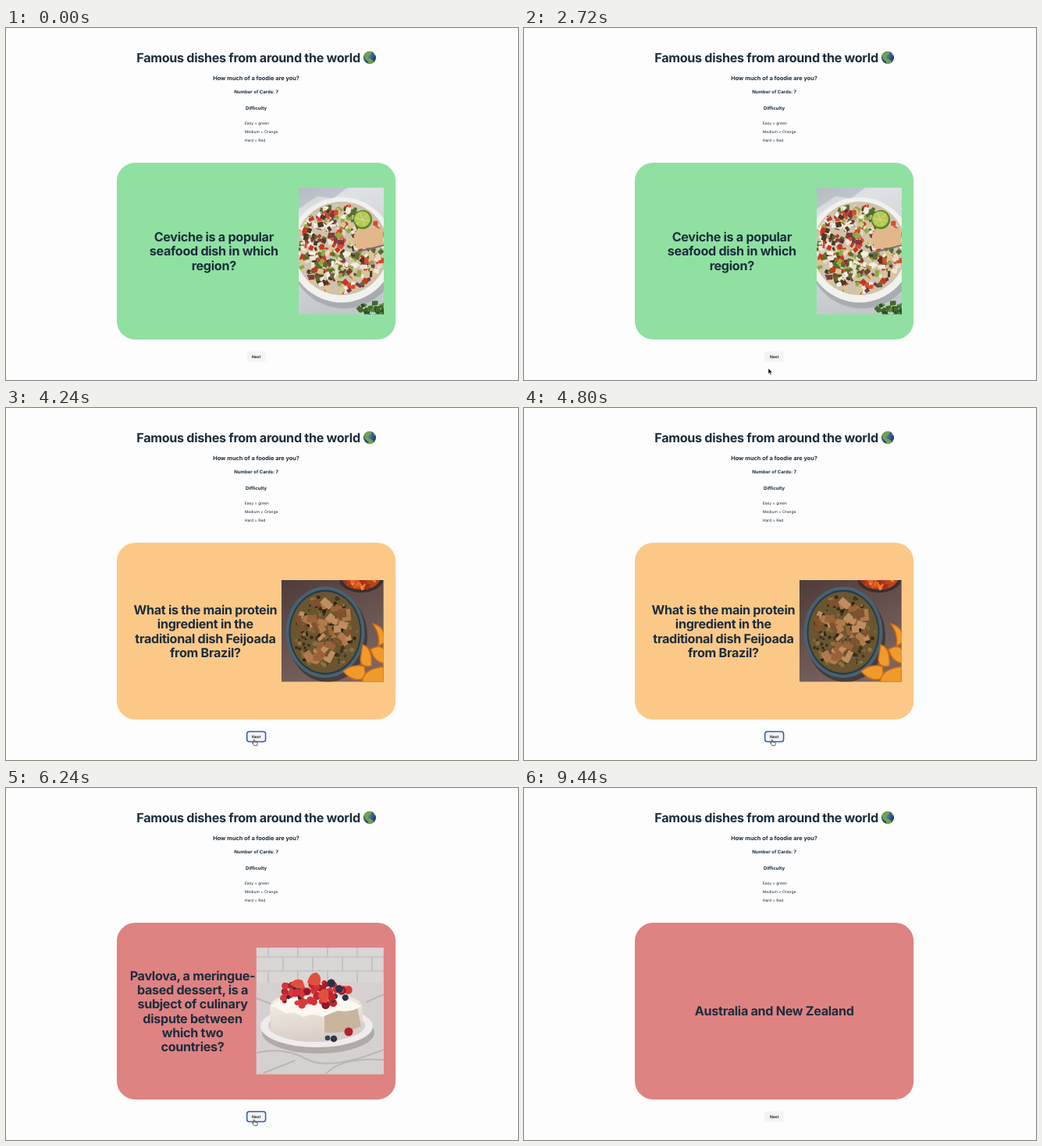
Write an HTML page that moves like this. It is 656x452 px and loops after 9760 ms.

```html
<!DOCTYPE html>
<html lang="en">
<head>
<meta charset="utf-8">
<title>Flashcards</title>
<style>
  html, body { margin: 0; width: 100%; height: 100%; overflow: hidden; background: #fdfdfd; }
  svg { display: block; width: 656px; height: 452px; }
  text { font-family: Inter, "Open Sans", sans-serif; fill: #1b2d3d; text-rendering: geometricPrecision; }
  .mid { text-anchor: middle; font-weight: 700; }
  .big { font-size: 16.2px; letter-spacing: -.02em; }
  .small { font-size: 6px; }
  .item { font-size: 5px; }

  .scene, .ring, .cursor > g { opacity: 0; animation: 9760ms step-end infinite; }
  #ceviche { animation-name: ceviche; }
  #feijoada { animation-name: feijoada; }
  #risotto { animation-name: risotto; }
  #pavlova { animation-name: pavlova; }
  #answer { animation-name: answer; }
  .ring { animation-name: ring; }
  @keyframes ceviche { 0% { opacity: 1 } 35.25%, 100% { opacity: 0 } }
  @keyframes feijoada { 0% { opacity: 0 } 35.25% { opacity: 1 } 54.92%, 100% { opacity: 0 } }
  @keyframes risotto { 0% { opacity: 0 } 54.92% { opacity: 1 } 60.66%, 100% { opacity: 0 } }
  @keyframes pavlova { 0% { opacity: 0 } 60.66% { opacity: 1 } 72.95%, 100% { opacity: 0 } }
  @keyframes answer { 0% { opacity: 0 } 72.95%, 100% { opacity: 1 } }
  @keyframes ring { 0% { opacity: 0 } 35.25% { opacity: 1 } 72.95%, 100% { opacity: 0 } }

  .cursor { animation: travel 9760ms ease-in-out infinite; }
  #beam { animation-name: beam; }
  #arrow { animation-name: arrow; }
  #hand { animation-name: hand; }
  @keyframes travel {
    0%, 5.74% { transform: translate(338px, 296px) }
    10.66%, 13.11% { transform: translate(325px, 276px) }
    22.95%, 29.51% { transform: translate(313px, 437px) }
    32.79%, 65.57% { transform: translate(318px, 425.8px) }
    71.31%, 81.97% { transform: translate(328px, 286px) }
    87.7%, 100% { transform: translate(624px, 424px) }
  }
  @keyframes beam {
    0% { opacity: 0 } 7.38% { opacity: 1 } 16.39% { opacity: 0 }
    69.67% { opacity: 1 } 83.61%, 100% { opacity: 0 }
  }
  @keyframes arrow {
    0% { opacity: 0 } 16.39% { opacity: 1 } 31.97% { opacity: 0 }
    67.21% { opacity: 1 } 69.67% { opacity: 0 }
    83.61% { opacity: 1 } 87.7%, 100% { opacity: 0 }
  }
  @keyframes hand { 0% { opacity: 0 } 31.97% { opacity: 1 } 67.21%, 100% { opacity: 0 } }
</style>
</head>
<body>
<svg viewBox="0 0 656 452">
  <defs>
    <clipPath id="tall"><rect x="375" y="205" width="109" height="162.5"/></clipPath>
    <clipPath id="mid"><rect x="353" y="221" width="130.7" height="130.5"/></clipPath>
    <clipPath id="wide"><rect x="320.8" y="205" width="163" height="162.5"/></clipPath>
    <clipPath id="disc"><circle cx="466" cy="38" r="8.2"/></clipPath>
    <radialGradient id="sea" cx=".4" cy=".35" r=".7">
      <stop offset="0" stop-color="#4a86c8"/><stop offset="1" stop-color="#16305f"/>
    </radialGradient>
    <linearGradient id="marble" x2=".3" y2="1">
      <stop offset="0" stop-color="#bcc3c8"/><stop offset=".2" stop-color="#dfe2e5"/>
      <stop offset="1" stop-color="#c3c7cc"/>
    </linearGradient>
    <linearGradient id="table" x2=".5" y2="1">
      <stop offset="0" stop-color="#4e3c3a"/><stop offset="1" stop-color="#7b6460"/>
    </linearGradient>
    <linearGradient id="cream" y2="1" x2=".2">
      <stop offset="0" stop-color="#f6efe7"/><stop offset="1" stop-color="#d9cfc6"/>
    </linearGradient>
    <rect id="card" x="142" y="173" width="357.2" height="227" rx="23.5"/>
  </defs>

  <rect width="656" height="452" fill="#fdfdfd"/>
  <text class="mid big" x="310.5" y="44">Famous dishes from around the world</text>
  <g clip-path="url(#disc)">
    <circle cx="466" cy="38" r="8.2" fill="url(#sea)"/>
    <path d="M458 34q3-4 8-4.500l3 1-1 3-3 2-1 3 3 1 4 3-1 3-3 4-2-1-1-5-4-4z" fill="#76a04c"/>
    <path d="M471 31l4 3-1 2-3-2z" fill="#a9a968"/>
  </g>
  <text class="mid" x="320.600" y="67.200" font-size="7.4">How much of a foodie are you?</text>
  <text class="mid small" x="320.600" y="84">Number of Cards: 7</text>
  <text class="mid small" x="320.600" y="105.200">Difficulty</text>
  <text class="item" x="305.800" y="124.200">Easy = green</text>
  <text class="item" x="305.800" y="135.400">Medium = Orange</text>
  <text class="item" x="305.800" y="146.400">Hard = Red</text>

  <g class="scene" id="ceviche">
    <use href="#card" fill="#90e0a2"/>
    <g clip-path="url(#tall)">
      <rect x="375" y="205" width="109" height="163" fill="url(#marble)"/>
      <path d="M375 205h62l-18 14-20-3-24 16z" fill="#aeb8bf" opacity=".6"/>
      <ellipse cx="433" cy="292" rx="69" ry="68" fill="#8d9296" opacity=".5"/>
      <circle cx="430" cy="285" r="67.500" fill="#f2f1ee"/>
      <circle cx="430" cy="283" r="60" fill="#cfc2ae"/>
      <g id="salad"></g>
      <path d="M447 262q10-9 36-4v22l-32 4q-8-10-4-22z" fill="#e2b78c"/>
      <circle cx="457" cy="246" r="12.200" fill="#5f8526"/>
      <circle cx="456.500" cy="245.500" r="10.300" fill="#b5c956"/>
      <path d="M447 244l19 4M453 237l7 17M464 239l-15 13" stroke="#dde59a" stroke-width=".7"/>
      <path d="M484 279l-28 7-12 4" stroke="#77716d" stroke-width="2" fill="none"/>
      <g id="herbs"></g>
    </g>
    <g class="mid big" data-x="266.3" data-y="274">Ceviche is a popular|seafood dish in which|region?</g>
  </g>

  <g class="scene" id="feijoada">
    <use href="#card" fill="#fcc888"/>
    <g clip-path="url(#mid)">
      <rect x="353" y="221" width="131" height="131" fill="url(#table)"/>
      <ellipse cx="455" cy="220" rx="28" ry="17" fill="#37302c"/>
      <ellipse cx="455" cy="219" rx="24" ry="14" fill="#b8451d"/>
      <g id="relish"></g>
      <ellipse cx="412" cy="293" rx="51" ry="59" fill="#2b2324" opacity=".6"/>
      <ellipse cx="409" cy="288" rx="50.500" ry="58.500" fill="#486272"/>
      <ellipse cx="409" cy="288" rx="46.500" ry="54.500" fill="#283b49"/>
      <ellipse cx="409" cy="288" rx="44.500" ry="52" fill="#6a5530"/>
      <g id="stew"></g>
      <g fill="#f09a2c" stroke="#cf6b13" stroke-width="1.500">
        <path d="M470 277q16 4 17 23l-10 6q3-15-7-29z"/>
        <path d="M457 304q13 4 11 27-13 3-14-8z"/>
        <path d="M467 310q13-8 19 2v16q-14-1-19-18z"/>
        <path d="M432 338q12-10 27-6l2 14q-16 8-29-8z"/>
        <path d="M456 352q2-17 28-20v20z"/>
      </g>
    </g>
    <g class="mid big" data-x="255.4" data-y="265">What is the main protein|ingredient in the|traditional dish Feijoada|from Brazil?</g>
  </g>

  <g class="scene" id="risotto">
    <use href="#card" fill="#90e0a2"/>
    <g class="mid big" data-x="262.5" data-y="283.3">What is the main ingredient|in Risotto?</g>
  </g>

  <g class="scene" id="pavlova">
    <use href="#card" fill="#df8282"/>
    <g clip-path="url(#wide)">
      <rect x="320" y="205" width="165" height="163" fill="#d9d7d6"/>
      <path d="M320 217h165M320 235h165M336 205v12M374 205v12M412 205v12M450 205v12M355 217v18M393 217v18M431 217v18M469 217v18M336 235v15M374 235v15M412 235v15M450 235v15" stroke="#b9b6b4" stroke-width="1.200"/>
      <rect x="320" y="249.500" width="165" height="118" fill="#d4d1d0"/>
      <path d="M321 340q35-8 64 8t99-12M410 367q20-22 74-18M321 270l20 8M462 275l22-10M330 366l40-16" stroke="#aaa6a7" stroke-width="2" fill="none" opacity=".6"/>
      <ellipse cx="400" cy="314" rx="72" ry="27" fill="#99918f" opacity=".6"/>
      <ellipse cx="398" cy="306" rx="72" ry="27" fill="#efeceb"/>
      <ellipse cx="398" cy="305" rx="62" ry="21" fill="#d5cfcc"/>
      <path d="M338 283q0-12 20-16h78q22 4 21 18l-1 20q-10 12-48 8l-5 12q-42 4-64-15z" fill="url(#cream)"/>
      <path d="M408 287l42-5 5 24q-20 10-47 8z" fill="#c9b59e"/>
      <path d="M340 280q12-14 56-13t59 13q-12 9-30 6l-20 8q-10-6-24 0-12-8-22-4-12-8-19-10z" fill="#fbf7f1"/>
      <g id="berries"></g>
      <path d="M386 250q3-13 12-13 8 5 4 15-8 4-16-2zM400 267q2-10 11-9 5 7 0 18-8 1-11-9zM364 252q6-9 16-5l3 9q-10 4-19-4z" fill="#e0503c"/>
      <circle cx="439" cy="313" r="5.500" fill="#b3202b"/>
      <circle cx="420" cy="322" r="4.300" fill="#2f3448"/>
      <circle cx="412" cy="321" r="3.300" fill="#39405a"/>
    </g>
    <g class="mid big" data-x="239" data-y="246.5">Pavlova, a meringue-|based dessert, is a|subject of culinary|dispute between|which two|countries?</g>
  </g>

  <g class="scene" id="answer">
    <use href="#card" fill="#df8282"/>
    <g class="mid big" data-x="320.7" data-y="292.3">Australia and New Zealand</g>
  </g>

  <rect x="308.300" y="415.300" width="24.600" height="13.600" rx="3.200" fill="#f4f4f4"/>
  <rect class="ring" x="308.700" y="415.600" width="23.900" height="13" rx="3" fill="none" stroke="#2859b8" stroke-width="1.500"/>
  <text class="mid" x="320.600" y="423.900" font-size="5" style="font-weight:600;fill:#111">Next</text>

  <g class="cursor">
    <g id="beam">
      <path d="M-1.500-4.300q1.500 0 1.500 1v6.600q0 1-1.500 1M1.500-4.300q-1.500 0-1.500 1m0 6.600q0 1 1.500 1" fill="none" stroke="#222" stroke-width=".7"/>
    </g>
    <g id="arrow">
      <path d="M0 0v7.200l1.700-1.500 1.200 2.700 1.200-.5-1.200-2.600h2.300z" fill="#000" stroke="#fff" stroke-width=".5"/>
    </g>
    <g id="hand">
      <path d="M-.8.600q.8-1.100 1.500 0v2.300l3 .7q.8.400.6 1.500l-.7 2.500h-3.800l-2.200-3q-.2-1.200 1.600-.3z" fill="#fff" stroke="#111" stroke-width=".7"/>
    </g>
  </g>
</svg>
<script>
  const NS = 'http://www.w3.org/2000/svg';
  const add = (parent, tag, attrs) => {
    const el = document.createElementNS(NS, tag);
    for (const key in attrs) el.setAttribute(key, attrs[key]);
    return parent.appendChild(el);
  };

  // Break card headings into centred lines.
  for (const group of document.querySelectorAll('[data-x]')) {
    const { x, y } = group.dataset;
    const lines = group.textContent.split('|');
    group.textContent = '';
    lines.forEach((line, i) => {
      add(group, 'text', { x, y: +y + i * 18.35 }).textContent = line;
    });
  }

  const random = seed => () => (seed = seed * 16807 % 2147483647) / 2147483647;

  // Spread small pieces evenly over an ellipse.
  function scatter(id, count, [cx, cy, rx, ry], size, colors, round) {
    const rnd = random(count * 97 + 11);
    const group = document.getElementById(id);
    for (let i = 0; i < count; i++) {
      const angle = rnd() * 2 * Math.PI, dist = Math.sqrt(rnd());
      const x = cx + rx * dist * Math.cos(angle), y = cy + ry * dist * Math.sin(angle);
      const w = size * (.6 + rnd() * .8), h = round ? w : size * (.4 + rnd() * .7);
      add(group, 'rect', {
        x: x - w / 2, y: y - h / 2, width: w, height: h, rx: round ? w / 2 : .8,
        fill: colors[Math.floor(rnd() * colors.length)],
        transform: `rotate(${rnd() * 180} ${x} ${y})`
      });
    }
  }

  scatter('salad', 420, [429, 283, 56, 56], 6.5,
    ['#efe6d6', '#f4eee2', '#e6d9c4', '#c8371f', '#d94a2c', '#93a844', '#55702c', '#7b3a42', '#d9c78f', '#4a3a26']);
  scatter('herbs', 36, [472, 362, 20, 9], 6, ['#3f6b2c', '#5a8a3a', '#2f5122']);
  scatter('relish', 45, [455, 220, 22, 12], 5, ['#d8571f', '#ec8a2e', '#a52c18', '#e2662c']);
  scatter('stew', 170, [409, 288, 41, 48], 4, ['#2a2118', '#3a2c1c', '#7d6534', '#8b7340', '#46351f'], true);
  scatter('stew', 44, [407, 287, 34, 40], 11, ['#b07a4c', '#9a6238', '#c08d60', '#80502f']);
  scatter('berries', 75, [394, 264, 47, 16], 8, ['#c3242c', '#a81c28', '#d83a38', '#8f1826', '#2c3046', '#d6303a'], true);
</script>
</body>
</html>
```
